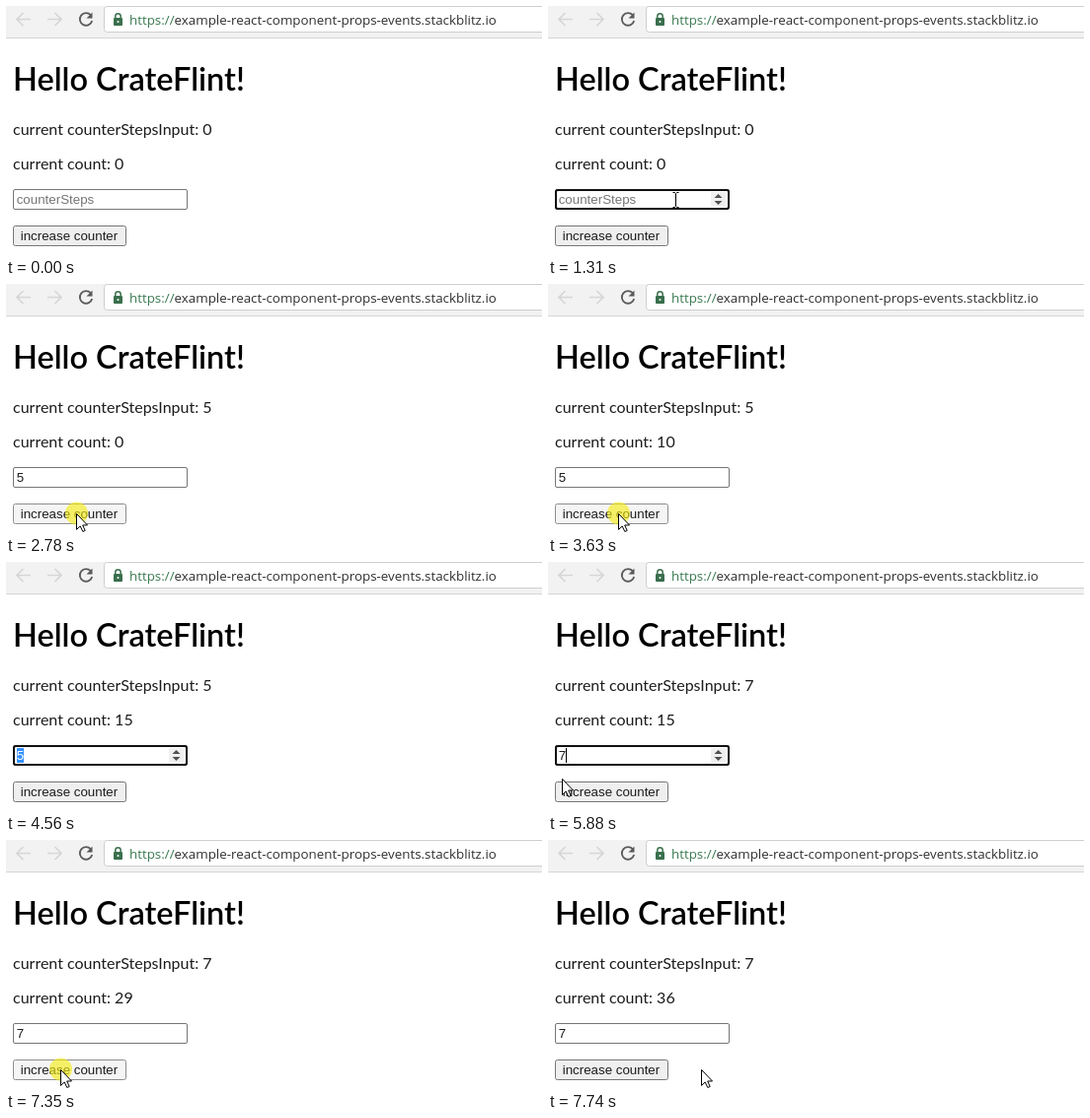
An HTML page for the animation above (7.81 s loop, 543 by 254 pixels).

```html
<!DOCTYPE html>
<html lang="en">
<head>
<meta charset="utf-8">
<style>
  html, body { margin: 0; width: 100%; height: 100%; overflow: hidden; background: #fff; }
  svg { display: block; width: 543px; height: 254px; }
  .page { font: 16px Lato, sans-serif; fill: #1c1c1c; }
  .title { font: 600 32.5px Lato, sans-serif; }
  .url { font: 13.36px "Open Sans", sans-serif; fill: #303030; }
  .form { font: 13.333px "Liberation Sans", Arial, sans-serif; fill: #1c1c1c; }
</style>
</head>
<body>
<svg viewBox="0 0 543 254">
  <rect width="543" height="32" fill="#f2f2f2"/>
  <rect y="32" width="543" height="1" fill="#d6d6d6"/>
  <g fill="none" stroke="#d6d6d6" stroke-width="1.7">
    <path d="M25 13.5H11.5M17.5 7L11 13.5L17.5 20"/>
    <path d="M42 13.5H55.5M49.5 7L56 13.5L49.5 20"/>
    <path d="M85.8 9.2A6.3 6.3 0 1 0 87.2 15" stroke="#5a5a5a" stroke-width="1.8"/>
  </g>
  <path d="M87.500 6.500V12.500H81.500Z" fill="#5a5a5a"/>
  <rect x="99.5" y=".5" width="460" height="26" rx="3" fill="#fff" stroke="#cecece"/>
  <rect x="109" y="12" width="9" height="8" rx="1" fill="#3a6f4d"/>
  <path d="M110.8 12.5V10.5A2.7 2.7 0 0 1 116.2 10.5V12.5" fill="none" stroke="#3a6f4d" stroke-width="1.5"/>
  <circle cx="113.5" cy="16" r="1" fill="#fff"/>
  <text class="url" x="125" y="19"><tspan fill="#3a7a50">https://</tspan>example-react-component-props-events.stackblitz.io</text>

  <text class="title" x="7" y="86">Hello CrateFlint!</text>
  <text class="page" x="7" y="131" id="steps"></text>
  <text class="page" x="7" y="166" id="count"></text>

  <rect x="7.5" y="186.5" width="176" height="20" rx="1.5" fill="#fff" stroke="#767676"/>
  <rect id="ring" x="8" y="187" width="175" height="19" rx="2" fill="none" stroke="#101010" stroke-width="2"/>
  <g id="spinner">
    <rect x="165" y="189" width="15" height="15" rx="1" fill="#efefef"/>
    <path d="M168.5 195L172.5 191L176.5 195ZM168.5 198L172.5 202L176.5 198Z" fill="#505050"/>
  </g>
  <rect id="selection" x="11" y="189" width="7" height="15" fill="#3390ff"/>
  <text class="form" x="10.7" y="201" id="field"></text>
  <rect id="caret" y="189" width="1" height="15"/>

  <rect id="button" x="7.5" y="223.5" width="114" height="20" rx="2"/>
  <text class="form" x="14.7" y="238">increase counter</text>

  <circle id="halo" cx=".5" r="11.5" fill="#f6ec10" fill-opacity=".62"/>
  <path id="arrow" d="M.5 .5V16.5L4.2 13L6.8 18.5L9.2 17.5L6.7 12H11.5Z" fill="#fff" stroke="#000"/>
  <path id="beam" d="M-3 -7.5H-1L0 -6.5L1 -7.5H3M0 -6.5V6.5M-3 7.5H-1L0 6.5L1 7.5H3" fill="none" stroke="#000"/>
</svg>
<script>
const LOOP = 7810;

// start, end, number of positions, from x, y, to x, y
const moves = [
  [150, 610, 7, 227, 248, 129, 197],
  [1860, 2400, 8, 122, 203, 71, 233],
  [3940, 4250, 5, 66, 227, 26, 195],
  [4330, 4560, 4, 18, 195, -14, 195],
  [5720, 6180, 7, -6, 214, 55, 233],
  [7670, 7740, 2, 105, 233, 155, 233]
];
const presses = [
  [760, 830], [2780, 2860], [3320, 3400], [3630, 3710],
  [4250, 4560], [6260, 6410], [6660, 6790], [7350, 7500]
];
const focusSpans = [[760, 2780], [4250, 6260]];
const caretSpans = [[760, 1310], [1690, 2220], [5570, 6100]];
const typed = [[1690, 5], [5570, 7]];
const buttonLook = {
  idle: ['#efefef', '#767676'],
  hover: ['#e5e5e5', '#4f4f4f'],
  active: ['#f5f5f5', '#8d8d8d']
};

const el = {};
document.querySelectorAll('[id]').forEach(e => el[e.id] = e);

const within = (spans, t) => spans.some(([a, b]) => t >= a && t < b);
const inBox = (p, x, y, w, h) => p.x >= x && p.x < x + w && p.y >= y && p.y < y + h;
const overButton = p => inBox(p, 7, 223, 115, 21);
const overField = p => inBox(p, 7, 186, 177, 21);
const show = (e, on) => e.setAttribute('visibility', on ? 'visible' : 'hidden');
const place = (e, p) => e.setAttribute('transform', `translate(${p.x} ${p.y})`);
const write = (e, s) => { if (e.textContent !== s) e.textContent = s; };

function pointer(t) {
  const move = moves.filter(m => t >= m[0]).pop();
  if (!move) return { x: -50, y: -50 };
  const [start, end, n, x0, y0, x1, y1] = move;
  const last = n - 1;
  const k = Math.min(last, Math.floor((t - start + 1) / (end - start) * last)) / last;
  return { x: Math.round(x0 + (x1 - x0) * k), y: Math.round(y0 + (y1 - y0) * k) };
}

function valueAt(t) {
  const entry = typed.filter(e => t >= e[0]).pop();
  return entry ? entry[1] : 0;
}

// Every completed click on the button adds the current step value.
function countAt(t) {
  return presses
    .filter(([down, up]) => t >= up && overButton(pointer(down)))
    .reduce((sum, [, up]) => sum + valueAt(up), 0);
}

function draw(t) {
  const p = pointer(t);
  const value = valueAt(t);
  const pressed = within(presses, t);
  const focused = within(focusSpans, t);
  const selected = t >= 4400 && t < 5570;
  const dragging = t >= 4250 && t < 5720;
  const isBeam = overField(p) || dragging;
  const [fill, stroke] = buttonLook[!overButton(p) ? 'idle' : pressed ? 'active' : 'hover'];

  write(el.steps, 'current counterStepsInput: ' + value);
  write(el.count, 'current count: ' + countAt(t));
  write(el.field, value ? String(value) : 'counterSteps');
  el.field.style.fill = selected ? '#fff' : value ? '#1c1c1c' : '#757575';
  el.caret.setAttribute('x', value ? 18 : 11);
  el.button.setAttribute('fill', fill);
  el.button.setAttribute('stroke', stroke);

  show(el.ring, focused);
  show(el.spinner, focused || overField(p));
  show(el.selection, selected);
  show(el.caret, within(caretSpans, t));
  show(el.halo, pressed);
  show(el.arrow, !isBeam);
  show(el.beam, isBeam);
  place(el.halo, p);
  place(el.arrow, p);
  place(el.beam, { x: p.x + .5, y: p.y });
}

const begin = performance.now();
function tick() {
  draw((performance.now() - begin) % LOOP);
  requestAnimationFrame(tick);
}
tick();
</script>
</body>
</html>
```
